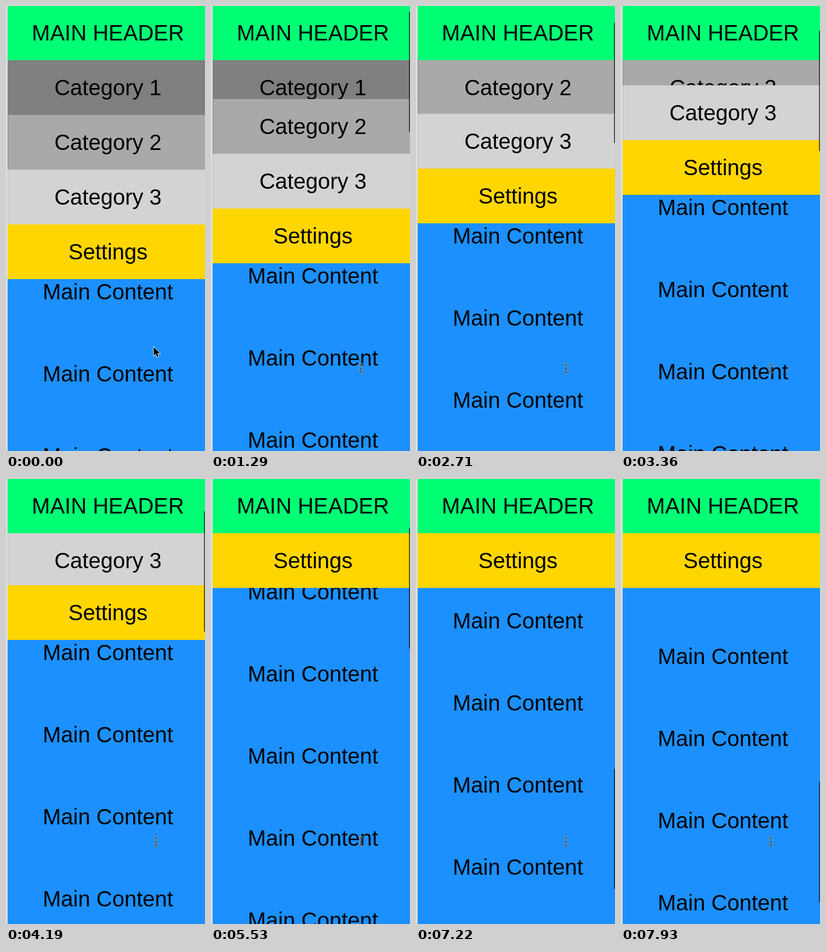
These frames come from a looping animation (363 px wide and 813 px high, 7.99 s). An HTML page:

```html
<!DOCTYPE html>
<html lang="en">
<head>
<meta charset="utf-8">
<title>Sticky headers</title>
<style>
  html, body { margin: 0; width: 100%; height: 100%; overflow: hidden; }
  body { position: relative; background: #dedede; }
  #page {
    position: absolute; left: 3px; top: 0; width: 366px; height: 813px;
    overflow: hidden; background: #1c90ff; color: #000;
    font: 40px "Liberation Sans", Arial, sans-serif; text-align: center;
  }
  #page div { position: absolute; left: 0; width: 100%; white-space: nowrap; }
  .bar { height: 100px; line-height: 100px; }
  #lines p { margin: 0 0 104px; height: 46px; line-height: 46px; }
  #thumb {
    position: absolute; left: 361px; top: 2px; width: 10px; height: 221px;
    border-radius: 2px; background: rgba(0, 0, 0, .6);
  }
  svg { position: absolute; left: 0; top: 0; overflow: visible; }
</style>
</head>
<body>
<div id="page"><div id="lines"></div></div>
<div id="thumb"></div>
<svg id="arrow" width="14" height="20">
  <path d="M0 0V16L3.7 12.6 6.2 18.2 8.8 17.1 6.4 11.6H11.4Z"
    stroke="#fff" stroke-width="1.6" paint-order="stroke"/>
</svg>
<svg id="beam" width="10" height="18" fill="none">
  <path id="stem" d="M-4 -8Q0 -8 0 -5.5Q0 -8 4 -8M0 -6V6M-4 8Q0 8 0 5.5Q0 8 4 8M-2 1H2"
    stroke="#fff" stroke-opacity=".7" stroke-width="2.6"/>
  <path d="M-4 -8Q0 -8 0 -5.5Q0 -8 4 -8M0 -6V6M-4 8Q0 8 0 5.5Q0 8 4 8M-2 1H2"
    stroke="#111" stroke-width="1.2"/>
</svg>
<script>
const LOOP = 7990;
const HEAD = 99;
const $ = id => document.getElementById(id);

// Refresh bursts: first step, last step, number of steps
const BURSTS = [
  [890, 1640, 14], [1700, 1990, 6], [2590, 3360, 14], [3420, 3420, 1],
  [3890, 4580, 13], [5180, 5950, 14], [6190, 6930, 14], [6990, 7460, 9],
  [7820, 7930, 3]
];

// Time, scroll offset
const SCROLL = [
  [832, 0], [890, 3], [1294, 29], [1640, 50], [1990, 76],
  [2531, 76], [2708, 102], [3100, 138], [3420, 158],
  [3832, 158], [4177, 205], [4580, 250],
  [5121, 250], [5535, 316], [5950, 361],
  [6133, 361], [6303, 425], [6450, 555], [6645, 831], [6930, 1400],
  [7200, 1890], [7460, 2134],
  [7760, 2134], [7820, 2126], [7880, 2073], [7930, 1998]
];

// Time, x, y, is it a text cursor
const POINTER = [
  [0, 269, 623, false], [110, 273, 630, false], [170, 276, 641, false],
  [230, 278, 660, true], [290, 273, 662, true]
];

const bars = [
  ["Category 1", "#808080", 99],
  ["Category 2", "#a9a9a9", 199, .2],
  ["Category 3", "#d3d3d3", 299, .1],
  ["Settings", "#ffd600", 399],
  ["MAIN HEADER", "#00ff74", -1]
].map(([text, color, top, edge]) => {
  const el = document.createElement("div");
  el.className = "bar";
  el.textContent = text;
  el.style.background = color;
  if (edge) el.style.boxShadow = `inset 1px 0 rgba(0, 0, 0, ${edge})`;
  $("page").append(el);
  return { el, top };
});

for (let i = 0; i < 17; i++) {
  const p = document.createElement("p");
  p.textContent = "Main Content";
  $("lines").append(p);
}

const place = (el, x, y) => { el.style.transform = `translate(${x}px, ${y}px)`; };

function snap(t) {
  const burst = BURSTS.filter(b => b[0] <= t).pop();
  if (!burst) return 0;
  const [start, end, count] = burst;
  if (count === 1) return start;
  const gap = (end - start) / (count - 1);
  return start + gap * Math.min(count - 1, Math.floor((t - start) / gap + .2));
}

function scrollAt(t) {
  const next = SCROLL.findIndex(k => k[0] > t);
  if (next === 0) return 0;
  if (next < 0) return SCROLL[SCROLL.length - 1][1];
  const [t0, a] = SCROLL[next - 1], [t1, b] = SCROLL[next];
  return Math.round(a + (b - a) * (t - t0) / (t1 - t0));
}

function draw(t) {
  const s = scrollAt(snap(t));
  bars.forEach(({ el, top }) => place(el, 0, top < 0 ? top : Math.max(HEAD, top - s)));
  place($("lines"), 0, 499 - s);

  $("thumb").style.visibility = t < 890 ? "hidden" : "visible";
  place($("thumb"), 0, s * .2755);

  const [, x, y, text] = POINTER.filter(p => p[0] <= t).pop();
  $("arrow").style.visibility = text ? "hidden" : "visible";
  $("beam").style.visibility = text ? "visible" : "hidden";
  place($(text ? "beam" : "arrow"), x + .5, y);
}

const begin = performance.now();
function tick() {
  draw((performance.now() - begin) % LOOP);
  requestAnimationFrame(tick);
}
tick();
</script>
</body>
</html>
```
